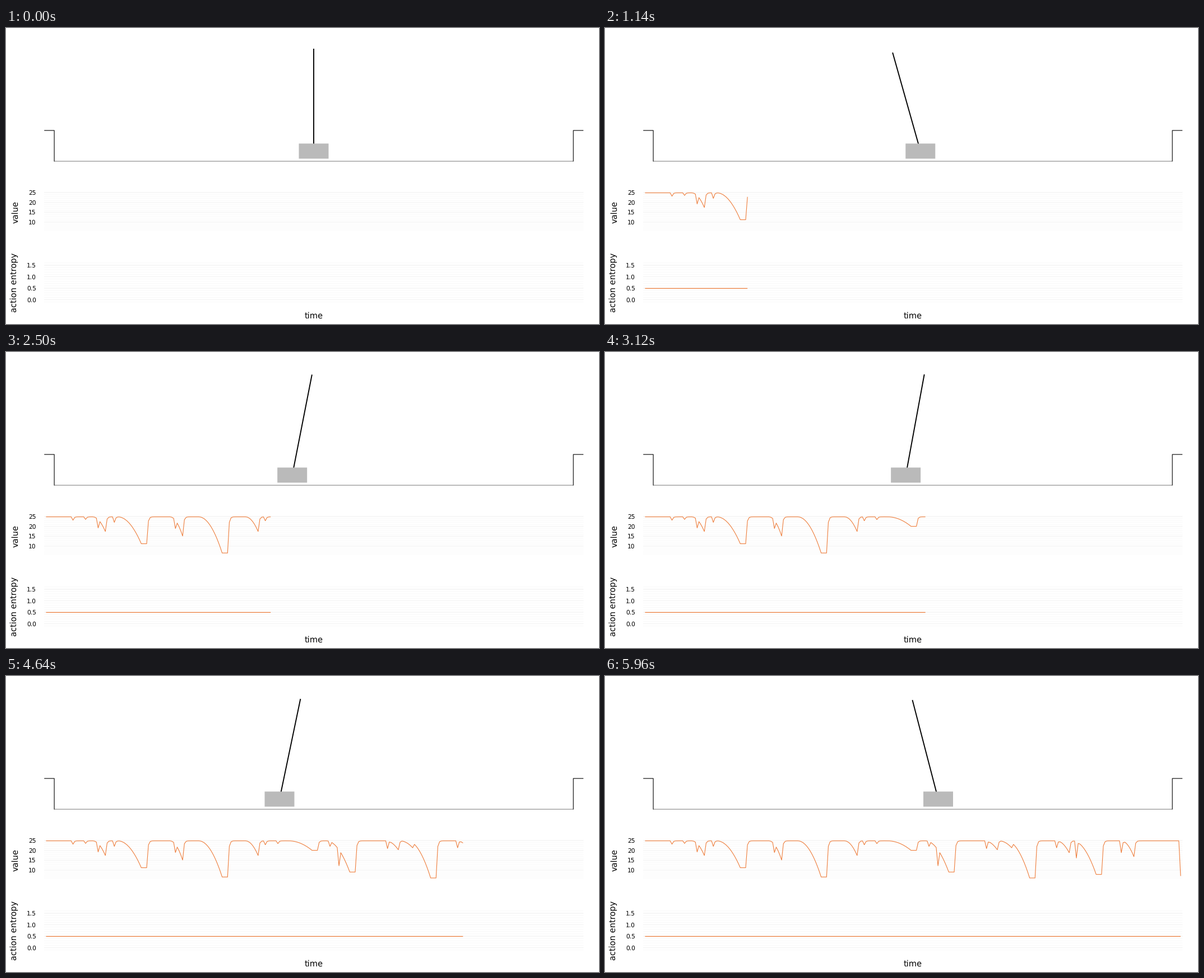
Animation of 1058 by 529 pixels, one loop 5980 ms. Source, as a matplotlib script:

```python
import numpy as np
import matplotlib.pyplot as plt
from matplotlib.animation import FuncAnimation
from matplotlib.patches import Rectangle

W, H, DPI = 1058, 529, 100
FRAMES, INTERVAL = 299, 20
LEFT, RIGHT = 68.2, 1030.2
CART_W, CART_H, CART_Y = 53, 27, 220
POLE, LAG = 183, 5
TOP_VALUE, ENTROPY = 24.8, 0.49
ORANGE = "#ee7d3b"

plt.rcParams["font.family"] = "DejaVu Sans"
plt.rcParams["text.hinting"] = "no_hinting"

steps = np.arange(FRAMES)


def px(size):
    """Pixels to points."""
    return size * 72 / DPI


def swing(times, stops):
    """Move between stops with constant push, then constant braking."""
    u = np.interp(steps, times, np.arange(len(times)))
    i = np.minimum(u.astype(int), len(times) - 2)
    s = u - i
    ease = np.where(s < 0.5, 2 * s**2, 1 - 2 * (1 - s)**2)
    return stops[i] + (stops[i + 1] - stops[i]) * ease


# Frames and places where the cart turns round
turns = np.array([
    (0, 549), (8, 549), (29, 505), (50, 580), (73, 487), (96, 575), (118, 490),
    (134, 544), (148, 524), (166, 556), (188, 484), (211, 549), (228, 482),
    (248, 557), (268, 495), (298, 594.5),
])
turn_time, turn_x = turns.T
cart_x = swing(turn_time, turn_x)

# The pole leans against each turn, a little later than the cart
lean = np.where(np.arange(len(turns)) % 2, -51.0, 38.0)
lean[:2] = 0
tip_dx = swing(turn_time + LAG, lean)


def drop(bottom, low, fall, hold=0):
    """Accelerating loss of value up to the bottom, then a quick recovery."""
    down = np.clip((steps - bottom + fall) / fall, 0, 1)**2
    after = np.maximum(steps - bottom - hold, 0)
    return (TOP_VALUE - low) * down * 0.15**after


slumps = [(53, 11.2), (98, 6.5), (148, 20), (169, 9), (214, 6), (251, 7.8)]
sags = [(33, 17.4), (76, 15.1), (118, 17.4), (196, 20.3), (204, 21.3),
        (236, 18.8), (272, 16.8)]
spikes = [(15, 23.1), (22, 23.5), (29, 19.2), (38, 22), (72, 18.9), (122, 22.8),
          (129, 23.4), (158, 22), (163, 12.2), (190, 20.9), (229, 21.3),
          (240, 16.1), (265, 18.8), (298, 7)]
drops = ([drop(*d, fall=13, hold=3) for d in slumps]
         + [drop(*d, fall=7) for d in sags]
         + [drop(*d, fall=1) for d in spikes])
value = TOP_VALUE - np.max(drops, axis=0)


def value_y(v):
    return 293.9 + (25 - v) * 3.53


def entropy_y(e):
    return 485.5 - e * 41


plot_x = LEFT + (steps + 1) * (RIGHT - LEFT) / 300
plot_value = value_y(value)
plot_entropy = np.full(FRAMES, entropy_y(ENTROPY))

fig = plt.figure(figsize=(W / DPI, H / DPI), dpi=DPI, facecolor="white")
ax = fig.add_axes([0, 0, 1, 1])
ax.set_xlim(0, W)
ax.set_ylim(H, 0)
ax.axis("off")


def grid(ys, color):
    ax.hlines(ys, LEFT, RIGHT, colors=color, linewidths=px(1), zorder=0,
              snap=False)


def label(x, y, text, size, **kw):
    ax.text(x, y, text, fontsize=px(size), va="baseline",
            rotation_mode="anchor", **kw)


def line(xs, ys, width, color="black", **kw):
    return ax.plot(xs, ys, color=color, lw=px(width), snap=False,
                   solid_capstyle="butt", **kw)[0]


def scale(to_y, minor, major, form):
    grid([to_y(v) for v in minor], "#f9f9f9")
    grid([to_y(v) for v in major], "#f2f2f2")
    for v in major:
        label(53.8, to_y(v) + 4.1, form.format(v), 10.67, ha="right")


scale(value_y, range(6, 26), range(10, 26, 5), "{}")
scale(entropy_y, np.arange(-1, 17) / 10, np.arange(4) / 2, "{:.1f}")

label(549.2, 519, "time", 14.67, ha="center")
label(21.5, 328.7, "value", 14.67, ha="center", rotation=90)
label(18.4, 455, "action entropy", 14.67, ha="center", rotation=90)

# Track: floor, walls and ledges
line([86, 1012], [238.1, 238.1], 1, "#777777")
for wall, edge in ((86.1, LEFT), (1012.2, RIGHT)):
    line([edge, wall, wall], [183.1, 183.1, 238.5], 1.2, "#111111")

pole = line([], [], 1.9, zorder=3)
cart = Rectangle((0, CART_Y - CART_H / 2), CART_W, CART_H, snap=False,
                 facecolor="#bababa", edgecolor="none", zorder=4)
ax.add_patch(cart)
value_line = line([], [], 1.1, ORANGE, zorder=5)
entropy_line = line([], [], 1.2, ORANGE, zorder=5)


def update(k):
    x, dx = cart_x[k], tip_dx[k]
    cart.set_x(x - CART_W / 2)
    pole.set_data([x, x + dx], [CART_Y, CART_Y - np.sqrt(POLE**2 - dx**2)])
    n = k + 1 if k else 0
    value_line.set_data(plot_x[:n], plot_value[:n])
    entropy_line.set_data(plot_x[:n], plot_entropy[:n])
    return cart, pole, value_line, entropy_line


anim = FuncAnimation(fig, update, frames=FRAMES, interval=INTERVAL,
                     init_func=lambda: update(0), repeat=True, repeat_delay=0)
plt.show()
```
